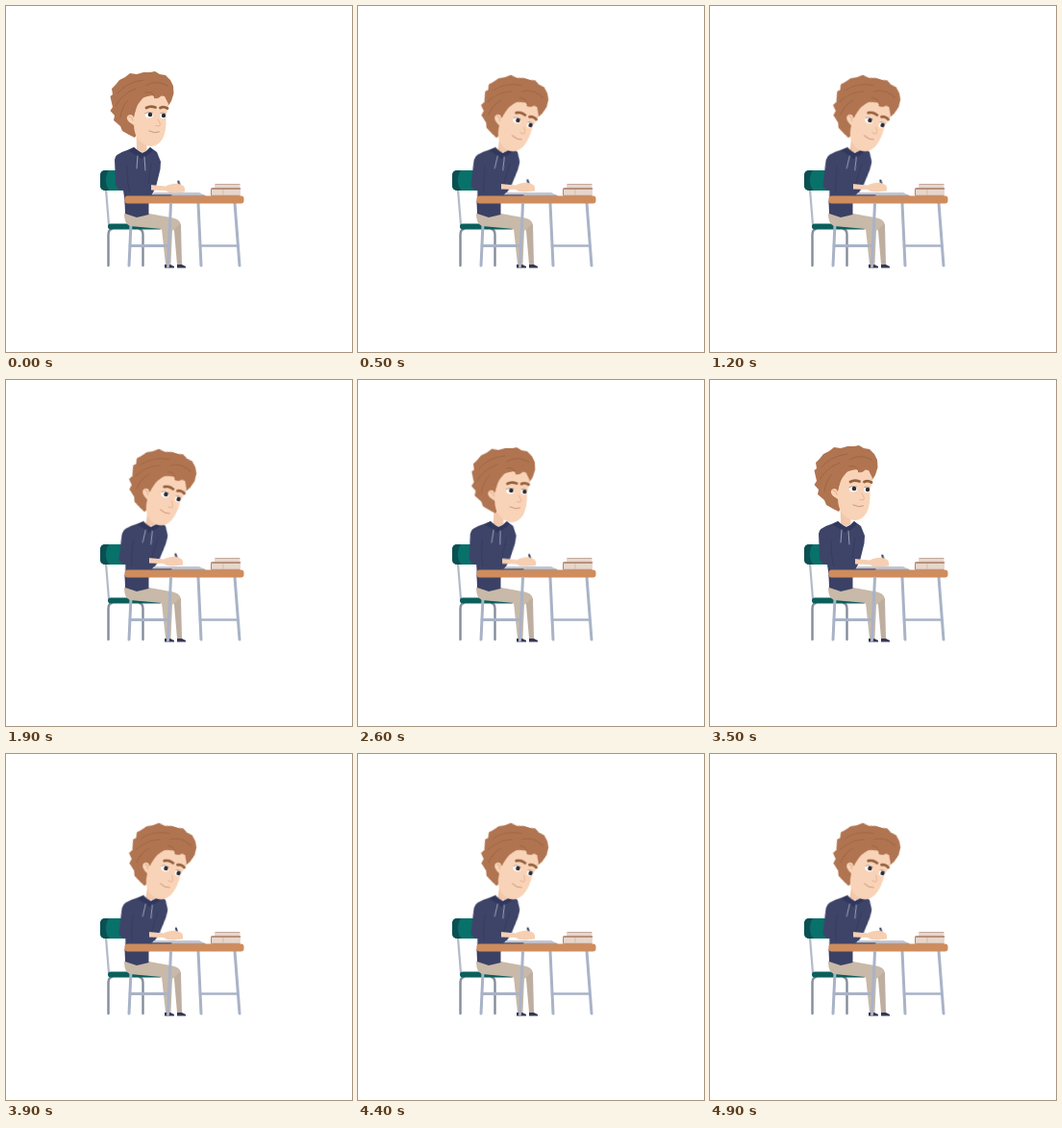
Recreate the animation shown at these times as an HTML page. Size 360 px wide and 360 px high, loop 5000 ms.

```html
<!DOCTYPE html>
<html lang="en">
<head>
<meta charset="utf-8">
<title>Student at a desk</title>
<style>
  html, body { margin: 0; width: 100%; height: 100%; overflow: hidden; background: #fff; }
  svg { display: block; width: 100vw; height: 100vh; }
  .head, .torso, .arm, .pen { animation: 5s linear infinite; }
  .head { transform-origin: 149px 113px; animation-name: head; }
  .torso { transform-origin: 135px 206px; animation-name: torso; }
  .arm { animation-name: arm; }
  .pen { animation: write .6s ease-in-out infinite alternate; }

  @keyframes head {
    0%, 2%, 55%, 71% { transform: translate(0, 0) rotate(0); }
    5%, 52%, 74% { transform: translate(9.5px, 2px) rotate(1deg); }
    8%, 49%, 77%, 100% { transform: translate(16.5px, 5.7px) rotate(17deg); }
  }
  @keyframes torso {
    0%, 2%, 55%, 71% { transform: skewX(0); }
    8%, 49%, 77%, 100% { transform: skewX(-9.5deg); }
  }
  @keyframes arm {
    0%, 2%, 55%, 71% { transform: translate(0, 0); }
    8%, 49%, 77%, 100% { transform: translate(-2px, -1px); }
  }
  @keyframes write {
    from { transform: translate(.4px, 0); }
    to { transform: translate(-.6px, -.3px); }
  }
</style>
</head>
<body>
<svg viewBox="0 0 360 360" fill="none" stroke-linecap="round" stroke-linejoin="round">
  <!-- chair -->
  <g>
    <path d="M104 191L107 228" stroke="#b3bac8" stroke-width="2.2"/>
    <path d="M106.500 270V238Q106.500 233 110 232M142.500 270V238Q142.500 233 139 232" stroke="#858e9c" stroke-width="2.400"/>
    <rect x="98" y="171" width="36" height="21" rx="5" fill="#08716a"/>
    <path d="M103 171Q98 171 98 177V186Q98 192 104 192H108Q104 189 104 182Q104 175 107 171Z" fill="#0a5052"/>
    <rect x="106" y="226.500" width="57" height="6" rx="3" fill="#0a5f5c"/>
  </g>

  <!-- far desk legs -->
  <g stroke="#a9b3c7" stroke-width="3">
    <path d="M131 205L128 270M200 205L203 270M238 205L243 270"/>
    <path d="M202 249.500H241" stroke-width="2.600"/>
  </g>

  <!-- legs and shoes -->
  <path d="M170 220Q181 221 182 228L183 269H178L175 234Z" fill="#bdaea0"/>
  <path d="M123 216H149L171 220Q181 222 181 227L173 234L171.500 269H166L162 232L129 229Q123 227 123 216Z" fill="#c8b9a9"/>
  <g fill="#353752">
    <path d="M165 269H171L175 271V272.500H165Z"/>
    <path d="M178 269H183L187 271V272.500H178Z"/>
  </g>
  <path d="M123.500 203H148.500V217L136 220L124 216Z" fill="#3b4165"/>

  <!-- body -->
  <g class="torso">
    <path d="M135.500 130H146.500V150Q142 154 136 150Z" fill="#f2c8ab"/>
    <path d="M133 147Q139 152 142 153Q147 151 150 147L157 152L161 162Q161 170 159 176L156 188Q151 197 148 206H124L122 192Q114 191 114 184L113 160Q113 154 126 150Z" fill="#3d4468"/>
    <path d="M133 147Q129 149 128 151Q136 155 141 159Q148 156 153 150L150 147Q147 151 142 153Q138 152 133 147Z" fill="#32385c"/>
    <path d="M126 167Q126 185 129 194M151 164Q149 177 148 188" stroke="#343a5d" stroke-width=".8"/>
    <path d="M137 156L136 169M144 157L145 171" stroke="#9ba0b5" stroke-width="1"/>
  </g>

  <!-- desk -->
  <rect x="123.500" y="197.500" width="124" height="8" rx="3" fill="#cf8c5c"/>
  <g stroke="#a9b3c7" stroke-width="3">
    <path d="M171.500 206L168.500 271"/>
    <path d="M129 249.500H169" stroke-width="2.800"/>
  </g>

  <!-- notebook and books -->
  <path d="M151 197.500L154 194H201L208 197.500Z" fill="#c3c6d1"/>
  <path d="M151 197H172" stroke="#53566f" stroke-width="1.600"/>
  <path d="M172 197.300H207" stroke="#8d91a4" stroke-width="1"/>
  <g>
    <rect x="217" y="185.300" width="26.500" height="4" rx="1" fill="#e6d6cb"/>
    <path d="M218 185.500H243" stroke="#b79c8d" stroke-width=".8"/>
    <rect x="213" y="190" width="31" height="7.500" rx="1" fill="#e6d6cb"/>
    <path d="M214 190H243.500" stroke="#ab7459" stroke-width="1.500"/>
    <path d="M213.500 191V197.300H243" stroke="#b98468" stroke-width="1"/>
    <path d="M226 191.500V196.500" stroke="#d4bca9" stroke-width="1"/>
  </g>

  <!-- writing arm -->
  <g class="arm">
    <path d="M179 182.500L180.500 188" class="pen" stroke="#3d405a" stroke-width="2"/>
    <path d="M150 186L166 187.500Q169 185.500 174 185Q181 184 185 187.500Q187 190 186 193.500L175 194.500Q169 194.500 166 192L150 191.500Z" fill="#f6cfb2"/>
    <path d="M145 184L151 185.500V192L144 194Z" fill="#3d4468"/>
  </g>

  <!-- head -->
  <g class="head">
    <path d="M110 101L108.500 94L111 92L110 86L114 82L118 77L124 74L129 70L136 71L143 69L150 69L155 68L160 71L166 72L171 77L174 83L174.500 91L172 99L168 105L140 126L134 137L128 134L121 130L119 125L112 119L113 114L108.500 109L111 105Z" fill="#b07450"/>
    <path d="M138 98Q149 91 165 94L169 102L166.500 116Q167 130 163 138Q158 146 151 146Q144 146 138 139Q133.500 134 133 124L130 122Q125 119 126 115Q129 111 133 115Z" fill="#f9d3b7"/>
    <path d="M128 115Q131 115 132 119" stroke="#dca886" stroke-width="1"/>
    <path d="M132 115Q129 99 141 84Q154 73 170 83Q175 91 170 102Q168 95 162 90Q162 97 154 96Q155 92 148 91Q142 95 139 100Q134 106 133 116Z" fill="#b07450"/>
    <path d="M116 91Q125 79 143 77M114 104Q121 91 135 86M119 116Q120 105 127 98M145 83Q156 76 168 83M145 90Q152 88 154 94" stroke="#9c6340" stroke-width=".8"/>
    <path d="M146 106Q150 103.500 155.500 105.500M160.500 106Q164 104 168 106.500" stroke="#96613f" stroke-width="2.800"/>
    <ellipse cx="149" cy="113" rx="4.200" ry="3.500" fill="#fff"/>
    <ellipse cx="163.500" cy="114" rx="3.300" ry="3.300" fill="#fff"/>
    <g fill="#2b2d33">
      <circle cx="150" cy="113" r="2.300"/>
      <circle cx="164" cy="114" r="2.200"/>
    </g>
    <path d="M145 111.500Q148 109 152.500 111M160.800 111.500Q163 110 166 112" stroke="#8d6750" stroke-width=".7"/>
    <path d="M158 118Q161.500 123.500 160 124.500Q158 125.500 156 124.500" stroke="#e2ad8d" stroke-width=".9"/>
    <path d="M149 130Q155 133 159.500 131" stroke="#c99078" stroke-width=".9"/>
  </g>
</svg>
</body>
</html>
```
